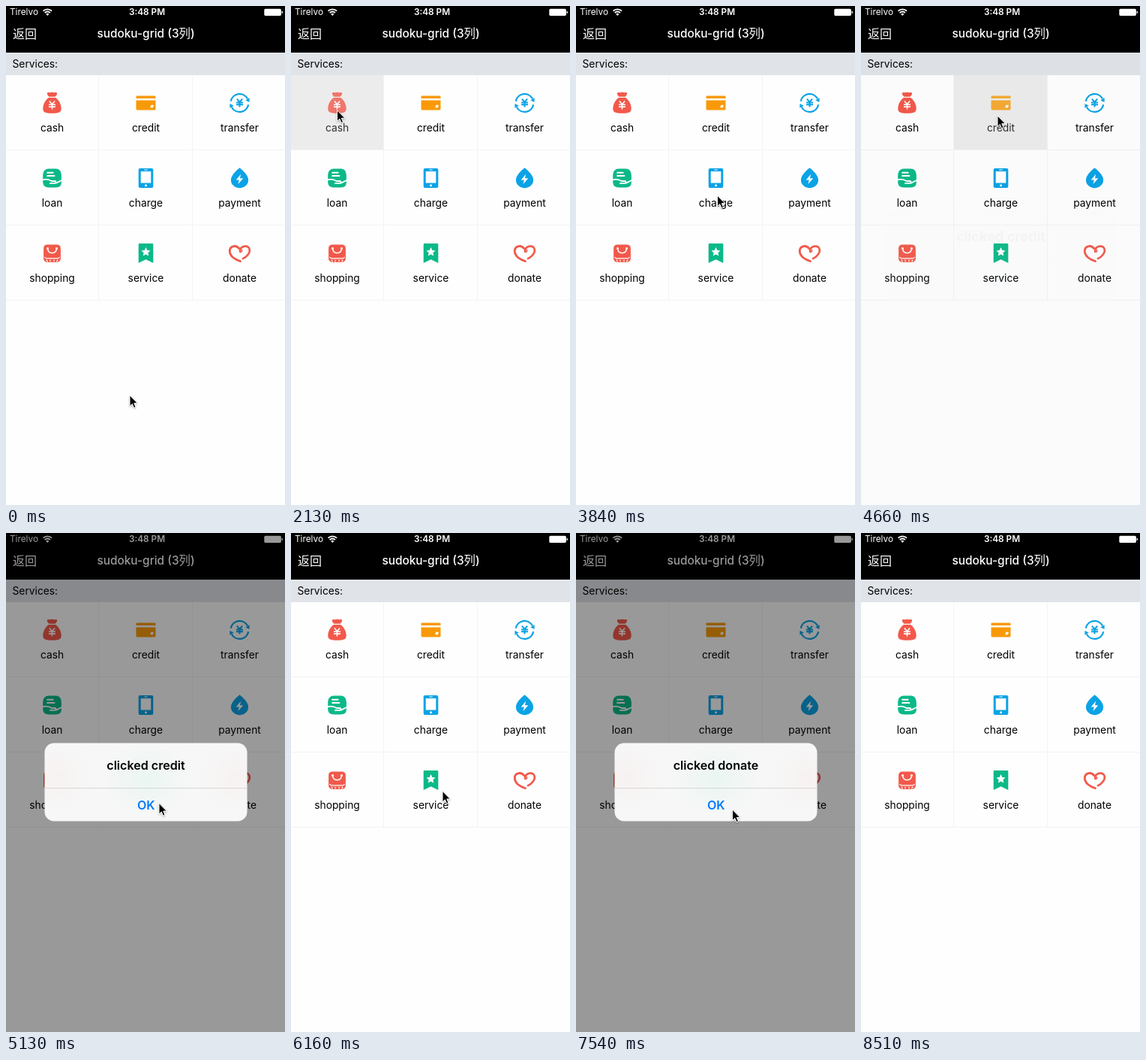
An HTML page that plays this animation: 372x664 px, repeating every 9.41 s.

```html
<!DOCTYPE html>
<html lang="en">
<head>
<meta charset="utf-8">
<title>Sudoku grid</title>
<style>
  html, body { margin: 0; width: 100%; height: 100%; overflow: hidden; background: #fefefe; }
  svg { display: block; width: 100%; height: 100%; }
  text { font-family: Inter, "Noto Sans CJK SC", "Noto Sans CJK", sans-serif; }
  .mid { text-anchor: middle; }
  .label { font-size: 13.8px; fill: #000; }
  .bold { font-size: 16.1px; font-weight: 600; }
  .cut { fill: none; stroke: #fff; stroke-linecap: round; stroke-linejoin: round; }
</style>
</head>
<body>
<svg viewBox="0 0 372 664" xmlns="http://www.w3.org/2000/svg">
  <defs>
    <radialGradient id="pink"><stop stop-color="#f6d9d3" stop-opacity=".2"/><stop offset="1" stop-color="#f6e4e0" stop-opacity="0"/></radialGradient>
    <radialGradient id="mint"><stop stop-color="#d9f4ec" stop-opacity=".5"/><stop offset="1" stop-color="#e4f5f0" stop-opacity="0"/></radialGradient>
    <clipPath id="round"><rect x="51.5" y="279.5" width="270" height="104" rx="12.5"/></clipPath>
    <filter id="shade" x="-50%" y="-50%" width="200%" height="200%">
      <feDropShadow dx="0" dy="1" stdDeviation=".9" flood-opacity=".35"/>
    </filter>
  </defs>

  <rect width="372" height="664" fill="#fefefe"/>
  <rect width="372" height="62" fill="#000"/>
  <g fill="#fff">
    <text x="5" y="12.4" font-size="11.8">Tirelvo</text>
    <text class="mid" x="188" y="12.4" font-size="11.8" font-weight="600">3:48 PM</text>
    <g fill="none" stroke="#fff" stroke-width="1.8">
      <path d="M49.5 6.7a8.2 8.2 0 0 1 11.6 0M51.7 9a5.1 5.1 0 0 1 7.2 0"/>
    </g>
    <path d="M55.3 12.9l-2.1-2.1a3 3 0 0 1 4.2 0z"/>
    <rect x="344.3" y="3.8" width="22.6" height="9.1" rx="1.6"/>
    <path d="M367.6 6.8q1.6.3 1.6 1.6t-1.6 1.6z"/>
    <text x="9" y="42.5" font-size="16" font-weight="300">返回</text>
    <text class="mid" x="186.5" y="42.4" font-size="15.4" font-weight="500">sudoku-grid (3列)</text>
  </g>
  <rect y="62" width="372" height="30" fill="#e0e3e8"/>
  <text class="label" x="8.5" y="82">Services:</text>

  <g id="cells"></g>
  <path d="M0 191.5H372M0 291.5H372M0 391.5H372M123.5 92V392M248.5 92V392" stroke="#f3f3f3" fill="none"/>

  <rect id="dim" width="372" height="664" fill="#000"/>
  <g id="alert">
    <g clip-path="url(#round)">
      <rect x="51" y="279" width="271" height="105" fill="#f7f7f7"/>
      <ellipse cx="68" cy="325" rx="48" ry="48" fill="url(#pink)"/>
      <ellipse cx="306" cy="325" rx="48" ry="48" fill="url(#pink)"/>
      <ellipse cx="187" cy="327" rx="62" ry="52" fill="url(#mint)"/>
      <path d="M51 339.5H322" stroke="#d6d7d6"/>
    </g>
    <text id="message" class="mid bold" x="186.5" y="315.4"></text>
    <text class="mid bold" x="186.8" y="368" fill="#007aff">OK</text>
  </g>
  <path id="cursor" d="M0 0V14.6L3.3 11.5L5.6 16.8L8 15.7L5.8 10.6H10.4Z" fill="#000" stroke="#fff" stroke-width="1" stroke-linejoin="round" filter="url(#shade)"/>
</svg>
<script>
const LOOP = 9410;
const RED = '#f2594b', BLUE = '#0ba3e6', GREEN = '#0bb988', ORANGE = '#f89a08';
const $ = id => document.getElementById(id);
const yen = (color, w) =>
  `<path fill="none" stroke="${color}" stroke-width="${w}" d="M-3.6-5.4L0-1L3.6-5.4M0-1V5.6M-4.5-.6H4.5M-4.5 2.3H4.5"/>`;
const cut = (d, w) => `<path class="cut" stroke-width="${w}" d="${d}"/>`;

// Icons are drawn around their own centre.
const icons = {
  cash: `<g fill="${RED}">
    <path d="M-4-8.2C-8.6-12.6-6.4-14.6-3.4-13.8Q0-14.6 3.4-13.8C6.4-14.6 8.6-12.6 4-8.2Z"/>
    <path d="M-4.6-7H4.6C9-4 12.2 2 12.2 7.5C12.2 12.5 9 13.8 0 13.8S-12.2 12.5-12.2 7.5C-12.2 2-9-4-4.6-7Z"/></g>
    <g transform="translate(0 2.8)">${yen('#fff', 1.6)}</g>`,
  credit: `<g fill="${ORANGE}"><path d="M-13-6V-8.2Q-13-9.6-11.6-9.6H11.6Q13-9.6 13-8.2V-6Z"/>
    <path d="M-13-3.4H13V8Q13 9.4 11.6 9.4H-11.6Q-13 9.4-13 8Z"/></g>
    <path fill="#fff" d="M6.8 2.8H10.4L9.4 6.2H5.8Z"/>`,
  transfer: `<g fill="none" stroke="${BLUE}" stroke-width="2.3">
    <path d="M-11.7-2.2A11.9 11.9 0 0 1 10.6-5.4M11.7 2.2A11.9 11.9 0 0 1-10.6 5.4"/></g>
    <path fill="${BLUE}" d="M7.8-3.6L13-1L13.2-6.8Z M-7.8 3.6L-13 1L-13.2 6.8Z"/>${yen(BLUE, 2)}`,
  loan: `<path fill="${GREEN}" d="M-4-12.6H5C10-12.6 12.4-9 12.4-2V5C12.4 10.3 10 12.4 4.5 12.4H-4C-10 12.4-12.3 10-12.3 4.5V-3C-12.3-9.3-9.5-12.6-4-12.6Z"/>
    ${cut('M-6.4-7.2H1.2M-6.4-3H3', 1.9)}
    ${cut('M-12.4 2.2C-7.5.8-4 1.8-.6 4H4.4Q6 6.2 3.6 6.9H-2.6M5.2 6.6L12.6 3', 1.9)}`,
  charge: `<rect x="-9.8" y="-13" width="19.6" height="26" rx="2" fill="${BLUE}"/>
    <path fill="#fff" d="M-6.8-8.9H6.8V6.5H-6.8Z"/><circle cy="9.7" r="1.5" fill="#fff"/>${cut('M-1.8-11H1.8', 1)}`,
  payment: `<path fill="${BLUE}" d="M0-13.8C4-10.5 11.6-4 11.6 2.4A11.6 10.8 0 0 1-11.6 2.4C-11.6-4-4-10.5 0-13.8Z"/>
    <path fill="#fff" d="M1.6-5.2L-4.8 2.5H-.7L-2 8L4.8.2H.5Z"/>`,
  shopping: `<rect x="-11.4" y="-11.6" width="22.8" height="23.6" rx="5" fill="${RED}"/>
    ${cut('M-6-6.2C-5 1.6 5 1.6 6-6.2', 1.5)}
    <circle cx="-6" cy="-6.4" r="1.5" fill="#fff"/><circle cx="6" cy="-6.4" r="1.5" fill="#fff"/>
    ${cut('M-9.8 5.4Q-8.6 6.8-7 6.8H7Q8.6 6.8 9.8 5.4M-7.4 9L-6.2 11M-2.5 9V11M2.5 9V11M7.4 9L6.2 11', 1.2)}`,
  service: `<path fill="${GREEN}" d="M-8.6-13H8.6Q9.8-13 9.8-11.8V13L0 8.2L-9.8 13V-11.8Q-9.8-13-8.6-13Z"/>
    <path fill="#fff" d="M0-8L1.8-4L6-3.5L2.9-.6L3.7 3.6L0 1.5L-3.7 3.6L-2.9-.6L-6-3.5L-1.8-4Z"/>`,
  donate: `<g fill="none" stroke="${RED}" stroke-linecap="round" stroke-linejoin="round">
    <path stroke-width="2.8" d="M-.8-6.4C-5-11.8-13.4-9.6-13.2-2.6C-13 4-6 8.8 1 10.6"/>
    <path stroke-width="2.6" d="M.8-2C-.6-6 3.6-9.6 7.6-9.4C13.6-9.2 15-3.4 11.4 1.4C9.4 4.2 7 5.8 4.4 7.2"/>
    <path stroke-width="1.3" d="M.8-2C3.2-1 4-3.8 2.6-4.6"/></g>`
};

const names = Object.keys(icons);
$('cells').innerHTML = names.map((name, i) => {
  const col = i % 3, row = Math.floor(i / 3);
  const x = [0, 124, 249][col], w = col === 1 ? 124 : 123, cx = 61.5 + 125 * col, top = 92 + 100 * row;
  return `<rect id="bg-${name}" x="${x}" y="${top}" width="${w}" height="99" fill="#ececec"/>
    <g id="cell-${name}"><g transform="translate(${cx} ${top + 37})">${icons[name]}</g>
    <text class="label mid" x="${cx}" y="${top + 75}">${name}</text></g>`;
}).join('');

// Each tap: pressed, released, alert opens, alert closes.
const taps = [
  { name: 'cash', down: 2130, up: 2640, open: 2520, close: 3530 },
  { name: 'credit', down: 4430, up: 4750, open: 4630, close: 5470 },
  { name: 'donate', down: 6690, up: 7080, open: 6960, close: 8000 }
];

// Pointer keys: time, x, y.
const path = [
  [0, 165, 518], [1230, 165, 518], [1420, 108, 400], [1640, 29, 222], [1820, 61.5, 138.7],
  [2900, 61.5, 138.7], [3170, 130, 265], [3480, 195, 359], [3600, 195, 359],
  [3840, 188.5, 252.5], [4180, 182, 146], [4740, 182, 146], [5110, 204, 359.5],
  [6040, 204, 359.5], [6160, 202, 343.5], [6290, 232, 333], [6450, 291, 328.5],
  [7090, 291, 328.5], [7530, 208.5, 368], [8100, 208.5, 368], [8490, 315, 690], [LOOP, 315, 690]
];

const clamp = v => Math.max(0, Math.min(1, v));
const easeOut = v => 1 - (1 - clamp(v)) ** 3;
const smooth = v => { v = clamp(v); return v * v * (3 - 2 * v); };

const slope = (i, k) => i < 0 || i >= path.length - 1 ? 0
  : (path[i + 1][k] - path[i][k]) / (path[i + 1][0] - path[i][0]);
const tangent = (i, k) => {
  const a = slope(i - 1, k), b = slope(i, k);
  return a * b <= 0 ? 0 : 2 * a * b / (a + b);
};

// Monotone cubic between pointer keys.
function along(t, k) {
  let i = 0;
  while (i < path.length - 2 && t >= path[i + 1][0]) i++;
  const a = path[i], b = path[i + 1], h = b[0] - a[0], u = (t - a[0]) / h;
  return a[k] + (b[k] - a[k]) * u * u * (3 - 2 * u)
    + h * u * (1 - u) * ((1 - u) * tangent(i, k) - u * tangent(i + 1, k));
}

function draw(t) {
  for (const name of names) {
    const pressed = taps.some(p => p.name === name && t >= p.down && t < p.up);
    $('bg-' + name).setAttribute('opacity', pressed ? 1 : 0);
    $('cell-' + name).setAttribute('opacity', pressed ? 0.8 : 1);
  }
  const tap = taps.find(p => t >= p.open && t < p.close + 290);
  let shown = 0, scale = 1;
  if (tap) {
    const enter = (t - tap.open) / 400;
    shown = smooth(enter * 1.3) * (1 - smooth((t - tap.close) / 290));
    scale = 1.18 - 0.18 * easeOut(enter);
    $('message').textContent = 'clicked ' + tap.name;
  }
  $('dim').setAttribute('opacity', 0.4 * shown);
  $('alert').setAttribute('opacity', shown);
  $('alert').setAttribute('transform', `translate(186.5 331.5) scale(${scale}) translate(-186.5 -331.5)`);
  $('cursor').setAttribute('transform', `translate(${along(t, 1)} ${along(t, 2)})`);
}

const start = performance.now();
function tick() {
  draw((performance.now() - start) % LOOP);
  requestAnimationFrame(tick);
}
tick();
</script>
</body>
</html>
```
